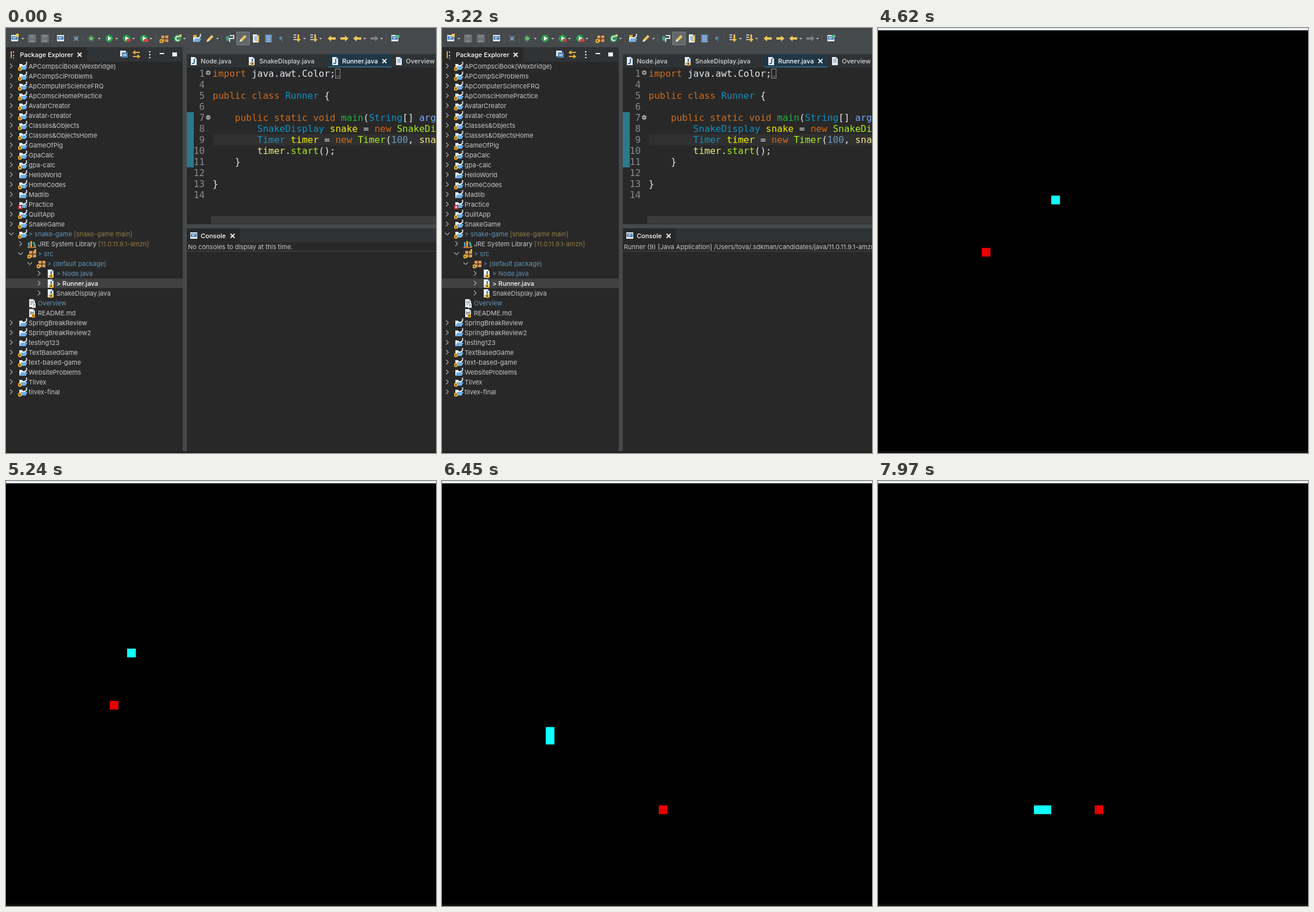
An HTML page that plays this animation: 742x732 px, repeating every 8000 ms.

```html
<!DOCTYPE html>
<html lang="en">
<head>
<meta charset="utf-8">
<title>Snake launch</title>
<style>
html, body { margin: 0; width: 100%; height: 100%; overflow: hidden; background: #282828; }
svg { position: absolute; left: 0; top: 0; display: block; }
text { white-space: pre; font: 11px Inter, "Open Sans", sans-serif; fill: #c9c9c9; }
.tab { font-weight: 500; fill: #d6d6d6; }
.on { font-weight: 500; fill: #fff; }
.code { font: 16px "DejaVu Sans Mono", monospace; }
.num { fill: #858b8f; text-anchor: end; }
.blue { fill: #6494b5; }
.gold { fill: #937b46; }
.k { fill: #cc6c1d; }
.t { fill: #1290c3; }
.m { fill: #1eb540; }
.c { fill: #a7ec21; }
.v { fill: #f2f200; }
.u { fill: #f3ec79; }
.p { fill: #79abff; }
.n { fill: #6897bb; }
.w { fill: #e2e8ef; }
.chev { fill: none; stroke: #a9a9a9; stroke-width: 1.2; }
</style>
</head>
<body>
<svg id="stage" width="742" height="732" viewBox="0 0 742 732">
  <defs>
    <pattern id="hatch" width="2" height="2" patternUnits="userSpaceOnUse">
      <path fill="#246577" d="M0 0h2v2H0z"/><path fill="#348da2" d="M0 0h1v1H0zM1 1h1v1H1z"/>
    </pattern>
    <g id="badge"><path d="M0 10q3-2 6 0v5q-3 2-6 0z" fill="#e5b13c"/><path d="M2 11h2v3H2z" fill="#694a17"/></g>
    <g id="folder">
      <path d="M2 4h5l1 2h5v8H2z" fill="#e5f1fb"/><path d="M5 8h11l-3 6H2z" fill="#70aee2"/>
      <path d="M14.500 0v4q0 2-3 1.500" fill="none" stroke="#e9f4ff" stroke-width="1.700"/>
    </g>
    <g id="project"><use href="#folder"/><use href="#badge"/></g>
    <g id="error"><use href="#folder"/><path d="M0 9h7v7H0z" fill="#d91f35"/><path d="M2 11l3 3m0-3l-3 3" stroke="#fff" stroke-width="1.300"/></g>
    <g id="page"><path d="M3 1h7l3 3v11H3z" fill="#e9eff5"/><path d="M10 1v3h3" fill="#93a9bd"/></g>
    <g id="java"><use href="#page"/><path d="M9 4v6q0 3-4 2" fill="none" stroke="#285f99" stroke-width="1.800"/></g>
    <g id="source"><use href="#java"/><use href="#badge" x="6"/></g>
    <g id="package"><path d="M3 3h12v11H3z" fill="#d79b58"/><path d="M9 2v13M2 8.500h14" stroke="#54361f" stroke-width="1.500"/><use href="#badge"/></g>
    <g id="srcdir"><use href="#package"/><path d="M12 0v4h3V0" fill="#e5b13c"/></g>
    <g id="library"><path d="M1 5h3v9H1z" fill="#4f9bc8"/><path d="M5 3h3v11H5z" fill="#e0a33a"/><path d="M9 5l3-1 3 9-3 1z" fill="#4ca88a"/><path d="M0 14h15" stroke="#c66c31" stroke-width="2"/></g>
    <g id="doc"><use href="#page"/><path d="M5 5h6M5 7.500h6M5 10h6" stroke="#5681a8"/></g>
    <g id="help"><use href="#doc"/><path d="M8 8h6v8H8z" fill="#fff"/><path d="M9.500 10.500q1.500-2 3 0l-1.500 2v2" fill="none" stroke="#444"/></g>
    <g id="word"><use href="#page"/><path d="M5 5l1 5 2-4 2 4 1-5" fill="none" stroke="#555"/><use href="#badge" x="7"/></g>
    <g id="screen"><path d="M2 2h12v11H2z" fill="#eaf2fa"/><path d="M3 4h10v6H3z" fill="#3e79ae"/><path d="M5 6h6M5 8h4" stroke="#fff"/></g>
    <g id="save"><path d="M1 1h14v14H1z" fill="#696e71"/><path d="M4 2h8v5H4zM4 10h8v5H4z" fill="#7b8083"/></g>
    <g id="play"><circle cx="8" cy="8" r="6.500" fill="#2c9c4e"/><path d="M6 4l6 4-6 4z" fill="#fff"/></g>
    <g id="bug"><path d="M3 3l10 10M13 3L3 13M8 1v14M1 8h14" stroke="#3f9479"/><circle cx="8" cy="8" r="3.500" fill="#67b96a"/></g>
    <g id="brush"><path d="M2 14l2-5 7-7 3 3-7 7z" fill="#ecc95f"/><path d="M2 14l2-5 3 3z" fill="#f7edd0"/></g>
    <g id="arrow"><path d="M1 8l6-5v3h8v4H7v3z" fill="#f0c95c"/></g>
    <g id="lines"><path d="M2 1h12v14H2z" fill="#5483b5"/><path d="M4 4h8M4 7h8M4 10h8M4 13h8" stroke="#d9e7f6"/></g>
  </defs>
  <g id="ide"></g>
  <g id="game" visibility="hidden">
    <path fill="#000" d="M0 0h742v732H0z"/>
    <path fill="#e9eef2" d="M0 0h742v4H0z"/>
    <path fill="#100b0c" d="M0 728h742v4H0z"/>
    <rect id="food" width="15" height="15" fill="#e60000"/>
    <rect id="snake" fill="#1ff"/>
  </g>
</svg>
<script>
const $ = id => document.getElementById(id);
const rect = (x, y, w, h, fill, more = '') =>
  `<rect x="${x}" y="${y}" width="${w}" height="${h}" fill="${fill}" ${more}/>`;
const icon = (id, x, y) => `<use href="#${id}" x="${x}" y="${y}"/>`;
const label = (x, y, s, cls = '') => `<text x="${x}" y="${y}" class="${cls}">${s}</text>`;
const span = (cls, s) => `<tspan class="${cls}">${s}</tspan>`;
const line = (d, color, w = 1) => `<path d="${d}" fill="none" stroke="${color}" stroke-width="${w}"/>`;
const cross = (x, y) => line(`M${x - 3.5} ${y - 3.5}l7 7m0 -7l-7 7`, '#f0f0f0', 1.8);

function panels() {
  return rect(0, 0, 742, 732, '#46494b') +
    rect(0, 33, 305, 26, '#303335') + rect(0, 33, 140, 26, '#282828') +
    rect(0, 58, 305, 671, '#282828') +
    rect(312, 45, 430, 23, '#2f3234') + rect(312, 68, 430, 270, '#282828') +
    rect(354, 324, 388, 13, '#3b3b3b') +
    rect(312, 345, 430, 25, '#303335') + rect(312, 345, 92, 25, '#282828') +
    rect(312, 369, 430, 360, '#282828') + rect(312, 384, 430, 1, '#4a4a4a') +
    rect(0, 729, 742, 3, '#211d1e');
}

function toolbar() {
  const at = (id, ...xs) => xs.map(x => icon(id, x - 8, 10)).join('');
  const drops = [29, 161, 191, 220, 250, 308, 365, 515, 543, 619, 648]
    .map(x => `<path d="M${x - 2.5} 17h5l-2.500 3z" fill="#b9bcbe"/>`).join('');
  const grips = [80, 107, 133, 259, 315, 372, 487, 656]
    .map(x => `<path d="M${x} 11v15" stroke="#777b7e" stroke-dasharray="1 2"/>`).join('');
  const down = x => line(`M${x - 6} 12h5m-5 4h5m-5 4h5`, '#e8edf0', 1.5) +
    `<path d="M${x + 1} 11h3v8h3l-4.500 5-4.500-5h3z" fill="#e9bd50"/>`;
  return rect(398, 7, 22, 22, '#62676a', 'stroke="#85898c"') + drops + grips +
    at('screen', 15, 94, 671) + rect(17, 10, 5, 5, '#f0c95c') + at('save', 45, 67) +
    line('M116 13l10 10M126 13l-10 10', '#739cb8') + `<circle cx="121" cy="18" r="3.500" fill="#738d9e"/>` +
    at('bug', 147) + at('play', 178, 208, 238) +
    rect(208, 19, 7, 5, '#bd443f') + rect(238, 19, 8, 5, '#d04448') +
    at('package', 273) + `<circle cx="296" cy="18" r="6.500" fill="#39975a"/>` +
    line('M299 15q-6 -2 -6 3t6 3', '#fff', 1.8) + rect(299, 11, 4, 4, '#f0c95c') +
    at('folder', 329) + rect(323, 12, 6, 4, '#e5b13c') + at('brush', 352, 409) +
    rect(380, 14, 5, 8, '#4f9b77') + line('M386 13h7v5h-7v6', '#d5dfe8', 2) +
    at('doc', 431) + line('M436 12v10h-6', '#e5b13c', 1.7) + at('lines', 453) +
    label(471, 23, '¶', 'n') + down(502) + down(531) +
    at('arrow', 562, 606) + `<use href="#arrow" transform="translate(592 10) scale(-1 1)"/>` +
    `<path d="M643 18l-6-5v3h-8v4h8v3z" fill="#7c8184"/>` + rect(672, 12, 7, 4, '#54b98f');
}

// Each row: depth, arrow (1 closed, 2 open, 0 none), icon, markup
const top1 = ['APCompsciBook(Wexbridge)', 'APCompSciProblems', 'ApComputerScienceFRQ', 'ApComsciHomePractice',
  'AvatarCreator', 'avatar-creator', 'Classes&amp;Objects', 'Classes&amp;ObjectsHome', 'GameOfPig', 'GpaCalc',
  'gpa-calc', 'HelloWorld', 'HomeCodes', 'Madlib', 'Practice', 'QuiltApp', 'SnakeGame'];
const top2 = ['SpringBreakReview', 'SpringBreakReview2', 'testing123', 'TextBasedGame', 'text-based-game',
  'WebsiteProblems', 'Tilvex', 'tilvex-final'];
const plain = ['Madlib', 'HelloWorld', 'SpringBreakReview', 'SpringBreakReview2', 'testing123', 'WebsiteProblems'];
const project = s => [0, 1, s === 'Practice' ? 'error' : plain.includes(s) ? 'folder' : 'project', s];
const rows = [
  ...top1.map(project),
  [0, 2, 'project', span('blue', '&gt; snake-game ') + span('gold', '[snake-game main]')],
  [1, 1, 'library', 'JRE System Library ' + span('gold', '[11.0.11.9.1-amzn]')],
  [1, 2, 'srcdir', span('blue', '&gt; src')],
  [2, 2, 'package', span('blue', '&gt; (default package)')],
  [3, 1, 'source', span('blue', '&gt; Node.java')],
  [3, 1, 'source', span('on', '&gt; Runner.java')],
  [3, 1, 'source', 'SnakeDisplay.java'],
  [1, 0, 'help', span('blue', 'Overview')],
  [1, 0, 'word', 'README.md'],
  ...top2.map(project)
];

function explorer() {
  const tree = rows.map(([depth, arrow, id, s], i) => {
    const x = depth * 16, y = 66 + i * 17;
    const chev = arrow === 1 ? `M${x + 7} ${y - 4.5}l4 4-4 4` : `M${x + 5} ${y - 2.5}l4 4 4-4`;
    return (arrow ? `<path class="chev" d="${chev}"/>` : '') +
      icon(id, x + 21, y - 8) + label(x + 39, y + 4, s);
  }).join('');
  return rect(0, 431.5, 305, 16.5, '#414141') + tree +
    line('M9 40v12M13 40v3m0 3v3m0 2v2', '#d6a45f', 2) + label(24, 50, 'Package Explorer', 'on') + cross(127, 46) +
    rect(197, 39, 10, 10, '#e1edf7') + rect(200, 42, 10, 9, '#5188b6') + line('M202 46.500h6', '#fff', 1.5) +
    line('M231 42h-11l3-3m-3 3l3 3M219 49h11l-3-3m3 3l-3 3', '#e5b13c', 1.8) +
    [41, 46, 51].map(y => `<circle cx="248" cy="${y}" r="1.300" fill="#eee"/>`).join('') +
    rect(265, 43, 8, 2, '#eee') + rect(287, 42, 8, 7, '#eee') + rect(288, 44, 6, 4, '#fff');
}

const code = [
  [1, span('k', 'import') + ' java.awt.Color;'],
  [4, ''],
  [5, span('k', 'public class ') + span('t', 'Runner') + ' {'],
  [6, ''],
  [7, '    ' + span('k', 'public static void ') + span('m', 'main') + '(' + span('t', 'String') + '[] ' + span('p', 'args') + ') {'],
  [8, '        ' + span('t', 'SnakeDisplay ') + span('v', 'snake') + ' = ' + span('k', 'new ') + span('c', 'SnakeDisplay') + '();'],
  [9, '        ' + span('t', 'Timer ') + span('v', 'timer') + ' = ' + span('k', 'new ') + span('c', 'Timer') + '(' + span('n', '100') + ', ' + span('u', 'snake') + ');'],
  [10, '        ' + span('u', 'timer') + '.' + span('c', 'start') + '();'],
  [11, '    }'],
  [12, ''],
  [13, '}'],
  [14, '']
];

function editor() {
  const tab = (id, x, tx, s, cls = 'tab') => icon(id, x, 49) + label(tx, 61, s, cls);
  const fold = (y, d) => `<circle cx="349" cy="${y}" r="3.800" fill="#aeb4b7"/>` + line(d, '#282828', 1.2);
  return rect(556, 45, 109, 23, '#203747') + rect(556, 66, 109, 2, '#316584') +
    tab('java', 316, 336, 'Node.java') + tab('source', 416, 437, 'SnakeDisplay.java') +
    tab('java', 560, 580, 'Runner.java', 'on') + cross(653, 57) + tab('doc', 670, 690, 'Overview') +
    rect(312, 145, 12, 95, 'url(#hatch)') + rect(357, 183, 385, 19, '#303030') +
    code.map(([n, s], i) => label(343, 84 + i * 19, n, 'code num') + label(356.5, 84 + i * 19, s, 'code w')).join('') +
    fold(77, 'M346.500 77h5m-2.500 -2.500v5') + fold(154, 'M346.500 154h5') +
    rect(568.5, 70.5, 8, 16, 'none', 'stroke="#8d9397"') + line('M570 83h5', '#8d9397');
}

$('ide').innerHTML = panels() + toolbar() + explorer() + editor() +
  icon('screen', 316, 350) + label(336, 362, 'Console', 'on') + cross(391, 358) +
  '<text id="console" x="314" y="381"></text>';

const LOOP = 8000, LAUNCH = 2720, OPEN = 3520, FIRST = 3620;
const CELL = 15, TICK = 101.45, TICK_ZERO = 3604.4, EATEN = 24;
const idle = 'No consoles to display at this time.';
const running = 'Runner (9) [Java Application] /Users/tova/.sdkman/candidates/java/11.0.11.9.1-amzn/bin/java';

const px = col => col * CELL - 1;
const py = row => row * CELL + 3.7;

// Up, left, down, then right
function cellAt(n) {
  if (n <= 5) return [25, 24 - n];
  if (n <= 18) return [30 - n, 19];
  if (n <= 36) return [12, n + 1];
  return [n - 24, 37];
}

// The bend is drawn as two straight cells, one always beside the other
function draw(t) {
  const playing = t >= OPEN;
  $('ide').setAttribute('visibility', playing ? 'hidden' : 'visible');
  $('game').setAttribute('visibility', playing ? 'visible' : 'hidden');
  if (!playing) {
    $('console').textContent = t < LAUNCH ? idle : running;
    return;
  }
  const n = Math.max(0, Math.floor((t - TICK_ZERO) / TICK));
  const eaten = n >= EATEN;
  const [hx, hy] = cellAt(n);
  const [tx, ty] = eaten ? cellAt(n - 1) : [hx, hy];
  const food = $('food'), snake = $('snake');
  food.setAttribute('x', px(eaten ? 25 : 12));
  food.setAttribute('y', py(eaten ? 37 : 25));
  snake.setAttribute('x', px(Math.min(hx, tx)));
  snake.setAttribute('y', py(Math.min(hy, ty)));
  snake.setAttribute('width', t < FIRST ? 0 : CELL * (1 + Math.abs(hx - tx)));
  snake.setAttribute('height', CELL * (1 + Math.abs(hy - ty)));
}

const start = performance.now();
function frame() {
  draw((performance.now() - start) % LOOP);
  requestAnimationFrame(frame);
}
frame();
</script>
</body>
</html>
```
